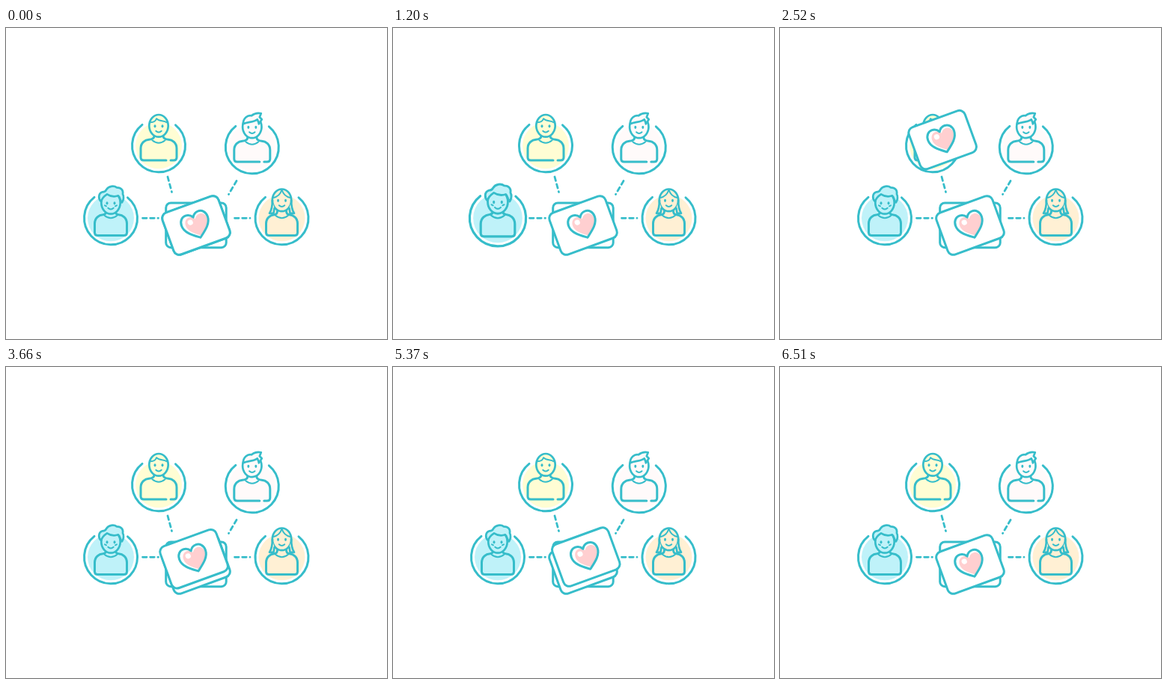
These frames come from a looping animation (509x416 px, 6900 ms). An HTML page:

```html
<!DOCTYPE html>
<html lang="en">
<head>
<meta charset="utf-8">
<title>Sharing cards</title>
<style>
  html, body { margin: 0; height: 100%; overflow: hidden; background: #fff; }
  svg { display: block; width: 100%; height: 100%; }
  .ink { fill: none; stroke: #36bdca; stroke-width: 3; stroke-linecap: round; stroke-linejoin: round; }
  .thin { stroke-width: 2; }
  .head { stroke-width: 2.7; }
  .dash { stroke-width: 2.8; stroke-dasharray: 5.5 4.7; }
  .white { fill: #fff; }
  .dot { fill: #36bdca; }
</style>
</head>
<body>
<svg viewBox="0 0 509 416">
  <defs>
    <path id="heart" d="M0 17.3C-9 10.5-18.5 4-18.5-6C-18.5-13-14-17-9-17C-5-17-2-15 0-11.5C2-15 5-17 9-17C14-17 18.5-13 18.5-6C18.5 4 9 10.5 0 17.3Z"/>
    <g id="card" transform="rotate(-20)">
      <rect class="ink white" x="-39.8" y="-29.7" width="79.6" height="59.4" rx="8"/>
      <use href="#heart" fill="#ffcfd0" transform="translate(1.9 .8) scale(.82)"/>
      <use href="#heart" class="ink"/>
      <circle class="white" cx="-6" cy="-6.3" r="3.6"/>
    </g>
  </defs>
  <path class="ink dash" d="M182.5 254.3H203.5M305.5 254.3H326M216 199L221.5 219.5M308 204.5L297.5 222.5"/>
  <g id="people"></g>
  <rect class="ink white" x="213.7" y="234" width="80.5" height="59.7" rx="6.5"/>
  <use href="#card" transform="translate(254 264)"/>
  <use href="#card" id="flyer"/>
</svg>
<script>
const LOOP = 6900, LEAD = 1380, FLIGHT = 1070;
const NS = 'http://www.w3.org/2000/svg';

// Each person is drawn around the middle of the ring.
const people = [
  { x: 140, y: 254.3, tint: '#bff2f9', half: 21.5, drop: 3.5, headY: -20.5, end: 1350,
    flight: 'M254 264C240 137 180 137 140 245',
    hair: 'M-13-22C-17-26-17-33-11-35C-9-35-7-36-6-38C-3-43 4-44 8-41C14-41 17-37 16-32' +
      'C18-29 17-24 15-21C12-23 13-28 10-30C4-28-2-30-5-32C-8-30-12-27-13-22Z',
    lines: 'M-8-17l2 1M8-17l-2 1' },
  { x: 204, y: 157.3, tint: '#fffdd4', half: 24, drop: 0, headY: -26.5, gap: true, end: 3030,
    flight: 'M254 264C356 220 290 127 212 151',
    lines: 'M-11-31C-7-31-4-33-3-36C1-32 6-34 11-31' },
  { x: 328.8, y: 159.3, tint: '#fffafa', half: 24, drop: 0, headY: -27, gap: true, end: 4800,
    flight: 'M254 264C205 150 330 142 325 155',
    hair: 'M-12-31C-12-39-6-43-1-42C3-45 8-46 12-45L10-40L13-37L9-31C9-33 8-35 7-37C2-33-5-34-12-31Z' },
  { x: 368.5, y: 254.3, tint: '#fff0d4', half: 21, drop: 3.5, headY: -24, end: 6510,
    flight: 'M254 264C307 121 350 121 367 232',
    hair: 'M-12.6-24C-12.6-14-14-10-16.5-6.5H-11L-10-13M12.6-24C12.6-14 14-10 16.5-6.5H11L10-13',
    lines: 'M0-38C-2-31-7-28-12-27M0-38C2-31 7-28 12-27' }
];

function body({ half: w, drop, gap }) {
  const y = v => v + drop;
  const base = y(19.6);
  const left = `H${4 - w}Q${-w} ${base} ${-w} ${y(15.6)}V${y(4)}` +
    `C${-w} ${y(-4)} ${6 - w} ${y(-7.6)} ${11 - w} ${y(-8)}Q-6 ${y(-8.5)} -6 ${y(-13)}`;
  const right = `M6 ${y(-13)}Q6 ${y(-8.5)} ${w - 11} ${y(-8)}` +
    `C${w - 6} ${y(-7.6)} ${w} ${y(-4)} ${w} ${y(4)}V${y(15.6)}Q${w} ${base} ${w - 4} ${base}H${gap ? 16 : 9}`;
  return `M${gap ? 10 : 9} ${base}${left}${right}`;
}

function draw(p) {
  const h = p.headY, c = p.drop - 7;
  return `<g>
    <circle r="31" fill="${p.tint}"/>
    <path class="ink" d="M-22-27.9A35.5 35.5 0 1 0 22.5-27.5"/>
    <path class="ink" d="${body(p)}"/>
    <path class="ink thin" d="M-8.5 ${c}Q0 ${c + 7} 8.5 ${c}"/>
    <ellipse class="ink head" style="fill:${p.tint}" cy="${h}" rx="12.7" ry="14.8"/>
    <path class="ink head" style="fill:${p.tint}" d="${p.hair || ''}"/>
    <path class="ink thin" d="${p.lines || ''}M-3.7 ${h + 7}Q0 ${h + 10.5} 3.7 ${h + 7}"/>
    <ellipse class="dot" cx="-5" cy="${h + .5}" rx="1.5" ry="2.1"/>
    <ellipse class="dot" cx="5" cy="${h + .5}" rx="1.5" ry="2.1"/>
  </g>`;
}

const group = document.getElementById('people');
const flyer = document.getElementById('flyer');
group.innerHTML = people.map(draw).join('');
people.forEach((p, i) => {
  p.node = group.children[i];
  p.route = document.createElementNS(NS, 'path');
  p.route.setAttribute('d', p.flight);
  p.length = p.route.getTotalLength();
});

const clamp = v => Math.min(1, Math.max(0, v));
const ease = v => v < .5 ? 4 * v ** 3 : 1 - 4 * (1 - v) ** 3;
const place = (node, x, y, scale) =>
  node.setAttribute('transform', `translate(${x} ${y}) scale(${scale})`);

function frame(now) {
  let x = 254, y = 264, size = 0;
  for (const p of people) {
    const t = (now - p.end + LEAD + LOOP) % LOOP;
    if (t < LEAD) {
      const at = p.route.getPointAtLength(p.length * ease(clamp(t / FLIGHT)));
      x = at.x;
      y = at.y;
      size = 1 - clamp((t - 940) / 180) ** 2;
    }
    const pulse = Math.sin(Math.PI * clamp((t - 960) / 420)) ** 2;
    place(p.node, p.x, p.y, 1 + .075 * pulse);
  }
  place(flyer, x, y, size);
  flyer.style.display = size > 0 ? '' : 'none';
}

const start = performance.now();
function tick() {
  frame((performance.now() - start) % LOOP);
  requestAnimationFrame(tick);
}
tick();
</script>
</body>
</html>
```
